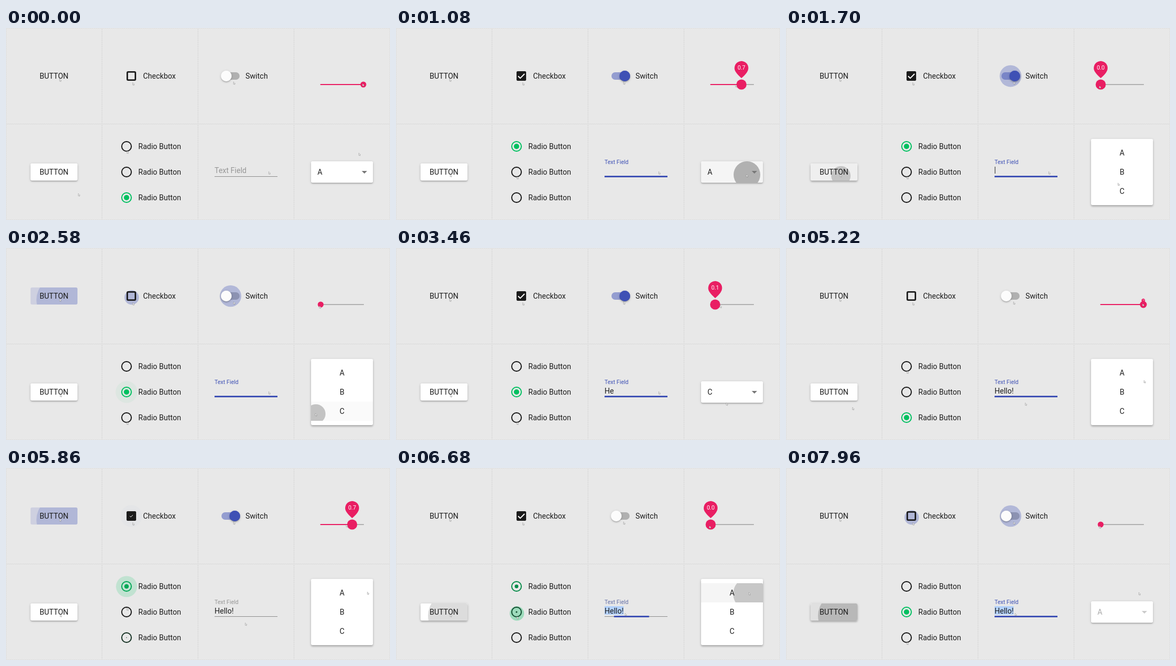
Animation, 720 px wide and 360 px high, one loop 8000 ms. Source, as an HTML page with a canvas:

```html
<!DOCTYPE html>
<html lang="en">
<head>
<meta charset="utf-8">
<title>Material controls</title>
<style>
html, body { margin: 0; width: 100%; height: 100%; overflow: hidden; background: #e8e8e8; }
canvas { display: block; width: 720px; height: 360px; }
</style>
</head>
<body>
<canvas id="stage"></canvas>
<script>
const LOOP = 8000;
const INK = '#1c1c1c', PINK = '#e91e63';
const INDIGO = [63, 81, 181], GREEN = [0, 192, 96], DARK = [26, 26, 26], BLACK = [0, 0, 0];
const LEAD = 150; // a press starts this long before it takes effect

const canvas = document.getElementById('stage');
const dpr = window.devicePixelRatio || 1;
canvas.width = 720 * dpr;
canvas.height = 360 * dpr;
const ctx = canvas.getContext('2d');
let t = 0;

// Timing helpers
const clamp = v => Math.max(0, Math.min(1, v));
const lerp = (a, b, p) => a + (b - a) * p;
const ramp = (start, dur, now = t) => clamp((now - start) / dur);
const smooth = p => p * p * (3 - 2 * p);
const out = p => 1 - Math.pow(1 - p, 3);
const rgb = (c, a = 1) => `rgba(${c.map(Math.round).join(',')},${a})`;
const mix = (a, b, p) => a.map((v, i) => lerp(v, b[i], p));

// Goes from 0 to 1 at the first time, back at the second, and so on
const toggle = (times, dur, now = t) =>
  times.reduce((v, at, i) => now < at ? v : i % 2 ? 1 - ramp(at, dur, now) : ramp(at, dur, now), 0);

function along(keys) {
  const n = keys.findIndex(k => t < k[0]);
  if (n < 1) return keys.at(n).slice(1);
  const [a, b] = [keys[n - 1], keys[n]];
  return mix(a, b, smooth(ramp(a[0], b[0] - a[0]))).slice(1);
}

// Growth and fade of the latest press, given the times at which presses take effect
function press(times, lead = LEAD) {
  const at = times.filter(time => t >= time - lead).pop();
  if (at === undefined) return { grow: 0, fade: 0, back: 0 };
  return {
    grow: out(ramp(at - lead, 186)),
    fade: 1 - ramp(at + 50, 130),
    back: ramp(at - lead, 60) * (1 - ramp(at + 50, 30))
  };
}

// Drawing helpers
function circle(x, y, r, fill) {
  ctx.beginPath();
  ctx.arc(x, y, r, 0, 7);
  ctx.fillStyle = fill;
  ctx.fill();
}

function box(x, y, w, h, r, fill) {
  ctx.beginPath();
  ctx.roundRect(x, y, w, h, r);
  ctx.fillStyle = fill;
  ctx.fill();
}

function line(x1, x2, y, width, color) {
  ctx.fillStyle = color;
  ctx.fillRect(x1, y - width / 2, x2 - x1, width);
}

function text(str, x, y, color = INK, size = 14, align = 'left') {
  ctx.font = `${size}px Roboto, sans-serif`;
  ctx.textAlign = align;
  ctx.fillStyle = color;
  ctx.fillText(str, x, y);
}

function raised(lift, draw) {
  ctx.save();
  ctx.shadowColor = 'rgba(0,0,0,.16)';
  for (const [drop, blur] of [[1, 5], [2 + lift, 2 + lift]]) {
    ctx.shadowOffsetY = drop * dpr;
    ctx.shadowBlur = blur * dpr;
    draw();
  }
  ctx.restore();
}

function cursor(x, y) {
  ctx.save();
  ctx.translate(x - 1.5, y - 2.5);
  ctx.beginPath();
  ctx.moveTo(0, 0);
  ctx.lineTo(0, 4.4);
  ctx.lineTo(1.1, 3.5);
  ctx.lineTo(2.3, 5.2);
  ctx.lineTo(2.1, 3.2);
  ctx.lineTo(3.4, 3.1);
  ctx.closePath();
  ctx.fillStyle = '#fafafa';
  ctx.fill();
  ctx.strokeStyle = 'rgba(110,110,110,.7)';
  ctx.lineWidth = 0.6;
  ctx.stroke();
  ctx.restore();
}

function halo(x, y, color, { grow, fade }) {
  circle(x + 2 * (1 - grow), y + 8 * (1 - grow), 20.5 * grow, rgb(color, 0.32 * fade));
}

function ripple([x, y, w, h, r], cx, cy, color, backAlpha, alpha, { grow, fade, back }) {
  ctx.save();
  ctx.beginPath();
  ctx.roundRect(x, y, w, h, r);
  ctx.clip();
  ctx.fillStyle = rgb(color, backAlpha * back);
  ctx.fillRect(x, y, w, h);
  circle(cx, cy, 43 * grow, rgb(color, alpha * fade));
  ctx.restore();
}

// Controls
function grid() {
  ctx.fillStyle = '#e8e8e8';
  ctx.fillRect(0, 0, 720, 360);
  ctx.strokeStyle = '#dedede';
  ctx.lineWidth = 1;
  ctx.setLineDash([3, 1]);
  for (let i = 0; i < 8; i++) ctx.strokeRect(i % 4 * 180 + 0.5, (i >> 2) * 180 + 0.5, 179, 179);
  ctx.setLineDash([]);
}

function flatButton() {
  ripple([46, 74, 88, 32, 3], 100, 97, INDIGO, 0.155, 0.2, press([2570, 5850]));
  text('BUTTON', 90, 95, INK, 14, 'center');
  cursor(102, 98);
}

function raisedButton() {
  const cycle = 4780, now = t % cycle;
  const p = press([1820, 3160, 1820 + cycle, 3160 + cycle]);
  raised(p.fade, () => box(46, 254, 88, 32, 3, '#fff'));
  ripple([46, 254, 88, 32, 3], 103, 277, BLACK, 0.12, 0.18, p);
  text('BUTTON', 90, 275, INK, 14, 'center');
  const away = 1 - smooth(ramp(100, 900, now)) + ramp(3300, 1480, now) ** 2;
  cursor(lerp(103, 137, away), lerp(277, 313, away));
}

function checkbox() {
  const clicks = [310, 1900, 2675, 4630, 5690, 7200, 8055];
  halo(235, 90, INDIGO, press(clicks));
  const v = toggle(clicks, 240);
  const fill = clamp(v / 0.4), tick = clamp((v - 0.45) / 0.55);
  box(226, 81, 18, 18, 3, rgb(DARK, fill));
  ctx.strokeStyle = INK;
  ctx.lineWidth = 2.8;
  ctx.beginPath();
  ctx.roundRect(227.4, 82.4, 15.2, 15.2, 1.8);
  ctx.stroke();
  ctx.save();
  ctx.translate(235, 90);
  ctx.scale(tick, tick);
  ctx.beginPath();
  ctx.moveTo(-6, 0.2);
  ctx.lineTo(-2, 4.2);
  ctx.lineTo(6, -4);
  ctx.strokeStyle = '#fff';
  ctx.lineWidth = 2;
  if (tick) ctx.stroke();
  ctx.restore();
  text('Checkbox', 257, 95);
  cursor(239, 105);
}

function switchControl() {
  const clicks = [300, 1700, 2595, 4460, 5430, 6260, 7975];
  const v = toggle(clicks, 400);
  box(404, 83, 34, 14, 7, rgb(mix([176, 176, 176], [148, 157, 208], v)));
  halo(421, 90, INDIGO, press(clicks));
  raised(0, () => circle(lerp(413, 429, v), 90, 10, rgb(mix([252, 252, 252], INDIGO, v))));
  text('Switch', 449, 95);
  cursor(428, 103.5);
}

function slider() {
  const now = t % 4792;
  const valueAt = time => 1 - smooth(ramp(740, 980, time)) + smooth(ramp(3330, 650, time));
  const v = valueAt(now), pointer = valueAt(now + 80);
  const active = smooth(toggle([380, 2200, 3230, 3980], 150, now));
  const x = lerp(590, 670, v);
  line(589.5, 671, 106, 2, '#b2b2b2');
  line(589.5, x, 106, 2, PINK);
  if (active) {
    ctx.save();
    ctx.translate(x, 106);
    ctx.scale(active, active);
    ctx.beginPath();
    ctx.arc(0, -31, 13, Math.PI * 0.8, Math.PI * 0.2);
    ctx.quadraticCurveTo(8, -19, 0, -12);
    ctx.quadraticCurveTo(-8, -19, -10.5, -23.4);
    ctx.fillStyle = PINK;
    ctx.fill();
    text(v.toFixed(1), 0, -28, '#fff', 10.5, 'center');
    ctx.restore();
  }
  circle(x, 106, lerp(5.5, 9.5, active), PINK);
  cursor(lerp(589, 670, pointer), lerp(111, 107, pointer));
}

function radios() {
  const picks = [-500, 420, 2420, 3600, 5750, 6640];
  const option = n => (n + 2) % 3;
  const n = picks.filter(at => t >= at).length - 1;
  const p = ramp(picks[n], 130);
  for (let i = 0; i < 3; i++) {
    const y = 222 + i * 48;
    const on = i === option(n) ? p : i === option(n + 2) ? 1 - p : 0;
    const color = rgb(mix(DARK, GREEN, on));
    halo(226, y, GREEN, press(picks.filter((_, k) => option(k) === i), 15));
    ctx.beginPath();
    ctx.arc(226, y, 9, 0, 7);
    ctx.strokeStyle = color;
    ctx.lineWidth = 2;
    ctx.stroke();
    circle(226, y, 5 * on, color);
    text('Radio Button', 248, y + 5);
  }
  const row = lerp(option(n), option(n + 1), smooth(ramp(picks[n] + 50, 100)));
  cursor(228, 233 + row * 48);
}

function textField() {
  const [enter, leave, pick] = [500, 5150, 6600];
  const focus = out(toggle([enter, leave, pick], 340));
  const focused = t >= enter && t < leave || t >= pick;
  const float = smooth(ramp(enter, 200));
  const value = 'Hello!'.slice(0, Math.ceil(6 * ramp(3300, 900)));
  ctx.font = '14px Roboto, sans-serif';
  const width = ctx.measureText(value).width;
  if (t >= pick) line(391, 391 + width, 267, 16, '#b3d1fb');
  text('Text Field', 391, lerp(272, 254.5, float), rgb(mix([150, 150, 150], INDIGO, focus)), lerp(14, 10.5, float));
  text(value, 391, 272.5);
  line(391, 509, 278.5, 1, '#8c8c8c');
  const origin = t < leave ? 494 : 431;
  const spread = focused ? focus : 1;
  line(lerp(origin, 391, spread), lerp(origin, 509, spread), 278.5, 3, rgb(INDIGO, focused ? 1 : focus));
  const blink = (t + 560) % 1060 < 530;
  if (focused && t < pick && blink) line(391.5 + width, 392.5 + width, 266.5, 13, INK);
  cursor(...along([[4700, 494, 272], [5100, 450, 293], [5900, 450, 293], [6500, 431, 275]]));
}

function selectMenu() {
  const turns = [1330, 3100, 4830, 7700];
  const shown = toggle(turns, 200);
  const label = 1 - toggle(turns.map((at, i) => at + i % 2 * 200), 160);
  const open = smooth(shown);
  const y = lerp(250, 208, open), h = lerp(40, 124, open);
  raised(open, () => box(572, y, 116, h, 3, '#fff'));
  if (label) {
    ripple([572, 250, 116, 40, 3], 658, 275, BLACK, 0.05, 0.28, press([1184]));
    ripple([572, 250, 116, 40, 3], 668, 270, BLACK, 0.05, 0.28, press([4660]));
    ctx.globalAlpha = label;
    text(t >= turns[1] && t < turns[3] ? 'C' : 'A', 584, 275);
    ctx.beginPath();
    ctx.moveTo(667, 268);
    ctx.lineTo(677, 268);
    ctx.lineTo(672, 273);
    ctx.fillStyle = '#777';
    ctx.fill();
    ctx.globalAlpha = 1;
  }
  if (shown) {
    ctx.save();
    ctx.beginPath();
    ctx.rect(572, y, 116, h);
    ctx.clip();
    ctx.globalAlpha = clamp(shown * 2 - 1);
    ripple([572, 216, 116, 36, 0], 663, 236, BLACK, 0.04, 0.19, press([6767]));
    ripple([572, 288, 116, 36, 0], 581, 311, BLACK, 0.04, 0.22, press([2700]));
    ['A', 'B', 'C'].forEach((s, i) => text(s, 630, 239 + i * 36, INK, 14, 'center'));
    ctx.restore();
  }
  cursor(...along([[0, 663, 237], [1000, 659, 277], [2500, 581, 313],
    [4500, 665, 270], [5860, 679, 235], [6600, 663, 236]]));
}

const parts = [grid, flatButton, checkbox, switchControl, slider, raisedButton, radios, textField, selectMenu];
const begin = performance.now();

function frame() {
  t = (performance.now() - begin) % LOOP;
  ctx.setTransform(dpr, 0, 0, dpr, 0, 0);
  parts.forEach(draw => draw());
  requestAnimationFrame(frame);
}
frame();
</script>
</body>
</html>
```
